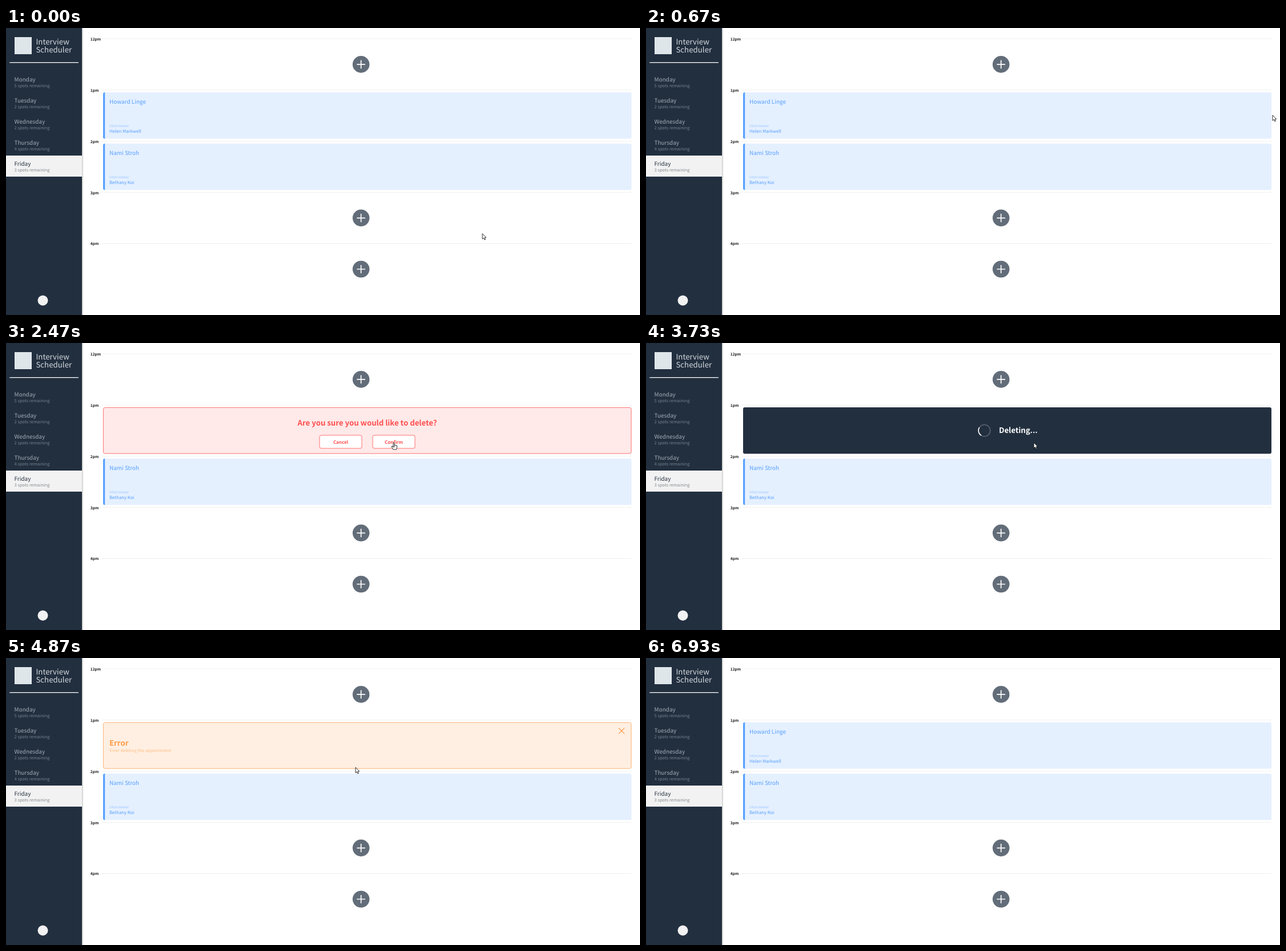
Write an HTML page that moves like this. It is 1110x504 px and loops after 7.54 s.

```html
<!DOCTYPE html>
<html lang="en">
<head>
<meta charset="utf-8">
<title>Interview Scheduler</title>
<style>
  html, body { margin: 0; width: 100%; height: 100%; overflow: hidden; background: #fff; }
  svg { display: block; width: 100vw; height: 100vh; }
  text {
    font-family: "Noto Sans CJK JP", "Noto Sans CJK SC", "Noto Sans CJK", "Noto Sans", sans-serif;
    text-rendering: geometricPrecision;
    white-space: pre;
  }
  .title { font-size: 13.3px; font-weight: 300; fill: #d3d8dd; }
  .day { font-size: 9.95px; fill: #a3acb6; }
  .spots { font-size: 7.5px; font-weight: 300; fill: #75818f; }
  .active .day { fill: #222f3e; }
  .active .spots { fill: #858a90; }
  .hour { font-size: 6.6px; font-weight: 600; fill: #1a1a1a; }
  .name { font-size: 9.95px; fill: #559fff; }
  .label { font-size: 6.45px; font-weight: 300; fill: #9cc6ff; }
  .who { font-size: 7.75px; fill: #559fff; }
  .fill { fill: #e5f0ff; }
  .tools { display: none; fill: none; stroke: #fff; stroke-width: .9; stroke-linejoin: round; }
  .on .fill { fill: #559fff; }
  .on .name, .on .who { fill: #fff; }
  .on .label { fill: #e0edff; }
  .on .tools { display: inline; }
  .big { font-size: 13.2px; font-weight: 600; }
  .small { font-size: 7.45px; font-weight: 300; }
  .btn { font-size: 8px; font-weight: 600; text-anchor: middle; fill: #ff4f4f; }
</style>
</head>
<body>
<svg viewBox="0 0 1110 504" preserveAspectRatio="none">
  <defs>
    <linearGradient id="shade">
      <stop offset="0" stop-color="#000" stop-opacity=".22"/>
      <stop offset="1" stop-color="#000" stop-opacity="0"/>
    </linearGradient>
    <rect id="box" x="170" y="113" width="925" height="81.5" rx="3"/>
    <rect id="frame" x="170.4" y="113.4" width="924.2" height="80.7" rx="3" stroke-width=".8"/>
  </defs>
  <rect width="1110" height="504" fill="#fff"/>

  <rect x="133" width="3" height="504" fill="url(#shade)"/>
  <rect width="133" height="504" fill="#222f3f"/>
  <rect x="15" y="16" width="30" height="30" fill="#dfe6ea"/>
  <text class="title" x="52.4" y="29.3">Interview</text>
  <text class="title" x="52.4" y="42.5">Scheduler</text>
  <rect x="6.3" y="60" width="120.7" height="1.3" fill="#fff"/>
  <rect y="224" width="133" height="37" fill="#f2f2f2"/>
  <g id="days"></g>
  <circle cx="64.5" cy="478.5" r="9" fill="#f2f2f2"/>

  <g id="hours"></g>
  <g id="cards"></g>

  <g id="confirm">
    <use href="#frame" fill="#ffe9e9" stroke="#ff4f4f"/>
    <text class="big" x="632.5" y="145" text-anchor="middle" fill="#ff4f4f">Are you sure you would like to delete?</text>
    <g fill="#fff" stroke="#ff4f4f" stroke-width=".8">
      <rect x="549" y="162" width="74" height="23" rx="3"/>
      <rect x="642" y="162" width="74" height="23" rx="3"/>
    </g>
    <text class="btn" x="586" y="176.5">Cancel</text>
    <text class="btn" x="679" y="176.5">Confirm</text>
  </g>

  <g id="status">
    <use href="#box" fill="#222f3f"/>
    <g fill="none" stroke="#fff" stroke-width="1.5" transform="translate(592.4 153.7)">
      <circle r="10.3" stroke-opacity=".26"/>
      <path id="arc" d="M10.3 0A10.3 10.3 0 0 0 0 -10.3"/>
    </g>
    <text class="big" x="618" y="158.4" fill="#fff">Deleting...</text>
  </g>

  <g id="error">
    <use href="#frame" fill="#ffefe2" stroke="#ff9f4f"/>
    <text class="big" x="181" y="153.8" fill="#ff9a45">Error</text>
    <text class="small" x="181.3" y="165.2" fill="#ffbd85">Error deleting the appointment</text>
    <path d="M1072.8 123l10 10m0-10l-10 10" stroke="#ffa155" stroke-width="1.3" fill="none"/>
  </g>

  <g id="pointer" fill="#fff" stroke="#000" stroke-width=".8" stroke-linejoin="round">
    <path id="arrow" d="M0 0V9.6L2.2 7.6L3.8 11L5.4 10.3L3.9 7H6.7Z"/>
    <g id="hand">
      <path d="M-1 7L-3.5 6V8L-1 12H4.5L5.4 9V5L1 4Z"/>
      <rect x="-1" width="2" height="8" rx="1"/>
    </g>
  </g>
</svg>

<script>
const $ = id => document.getElementById(id);
const LOOP = 7540, STEP = 200 / 3;

const days = [["Monday", 5], ["Tuesday", 2], ["Wednesday", 2], ["Thursday", 4], ["Friday", 3]];
$("days").innerHTML = days.map(([day, n], i) => `
  <g class="${day === "Friday" ? "active" : ""}" transform="translate(14.6 ${37 * i})">
    <text class="day" y="93.7">${day}</text>
    <text class="spots" y="104">${n} spots remaining</text>
  </g>`).join("");

const bookings = { "1pm": ["Howard Linge", "Helen Markwell"], "2pm": ["Nami Stroh", "Bethany Koi"] };
const plus = `<circle cx="621.6" cy="63.9" r="14.8" fill="#626d79"/>
  <path d="M614.3 63.9h14.6m-7.3-7.3v14.6" stroke="#fff" stroke-width="1.7"/>`;
$("hours").innerHTML = ["12pm", "1pm", "2pm", "3pm", "4pm"].map((hour, i) => `
  <g transform="translate(0 ${89.9 * i})">
    <rect x="167" y="18.6" width="928" height=".8" fill="#ededed"/>
    <text class="hour" x="147.8" y="21.9">${hour}</text>
    ${bookings[hour] ? "" : plus}
  </g>`).join("");

$("cards").innerHTML = Object.values(bookings).map(([name, who], i) => `
  <g id="card${i}" transform="translate(0 ${90 * i})">
    <use class="fill" href="#box"/>
    <path fill="#559fff" d="M173.2 113v81.5a3.2 3.2 0 0 1-3.2-3.2v-75.1a3.2 3.2 0 0 1 3.2-3.2Z"/>
    <text class="name" x="181" y="132.5">${name}</text>
    <text class="label" x="181" y="174">Interviewer</text>
    <text class="who" x="181" y="184">${who}</text>
    <g class="tools">
      <path d="M1066 174.8h-7.5v9.6h9.6v-4.7M1062.6 180.8l.6-2.5 5-4.9 1.8 1.8-5 5Z"/>
      <path d="M1074.4 175.2h9.4m-6.4 0v-1.7h3.4v1.7m-5.4 0l.5 9.4h6.4l.5-9.4m-5 2v5.4m2.4 0v-5.4"/>
    </g>
  </g>`).join("");

// each pointer move: start time, end time, destination
const home = { x: 834, y: 361 };
const moves = [
  [0, 666, 1097, 153],
  [666, 900, 1079, 177],
  [900, 1150, 1060, 180],
  [1200, 1530, 1079, 177],
  [1670, 2460, 679, 175],
  [4400, 4866, 612, 192],
  [4866, 5070, 740, 209],
  [5070, 5800, 1076, 131],
  [6000, 6866, 161, 499]
];

const ease = k => k * k * (3 - 2 * k);

function locate(t) {
  let { x, y } = home;
  for (const [from, to, tx, ty] of moves) {
    const k = ease(Math.min(1, Math.max(0, (t - from) / (to - from))));
    x += (tx - x) * k;
    y += (ty - y) * k;
  }
  return [Math.round(x), Math.round(y)];
}

const show = (id, on) => { $(id).style.display = on ? "inline" : "none"; };

function viewAt(t) {
  if (t < 1660 || t >= 5930) return "card0";
  if (t < 2660) return "confirm";
  return t < 4060 ? "status" : "error";
}

function draw(ms) {
  const t = Math.floor((ms % LOOP + 4) / STEP) * STEP;
  const [x, y] = locate(t), view = viewAt(t), seen = t < 6930;
  const over = (left, top, w, h) => seen && x >= left && x <= left + w && y >= top && y <= top + h;

  for (const id of ["card0", "confirm", "status", "error"]) show(id, id === view);
  $("card0").classList.toggle("on", over(170, 113, 925, 82));
  $("card1").classList.toggle("on", over(170, 203, 925, 82));
  $("arc").setAttribute("transform", `rotate(${(t - 3733) * .36 + 212})`);

  const hand = view === "card0" && (over(1057, 172, 14, 14) || over(1073, 172, 12, 14))
    || view === "confirm" && (over(549, 162, 74, 23) || over(642, 162, 74, 23))
    || view === "error" && over(1071, 121, 14, 14);
  show("pointer", seen);
  show("hand", hand);
  show("arrow", !hand);
  $("pointer").setAttribute("transform", `translate(${x} ${y})`);
}

const start = performance.now();
function tick() {
  draw(performance.now() - start);
  requestAnimationFrame(tick);
}
tick();
</script>
</body>
</html>
```
